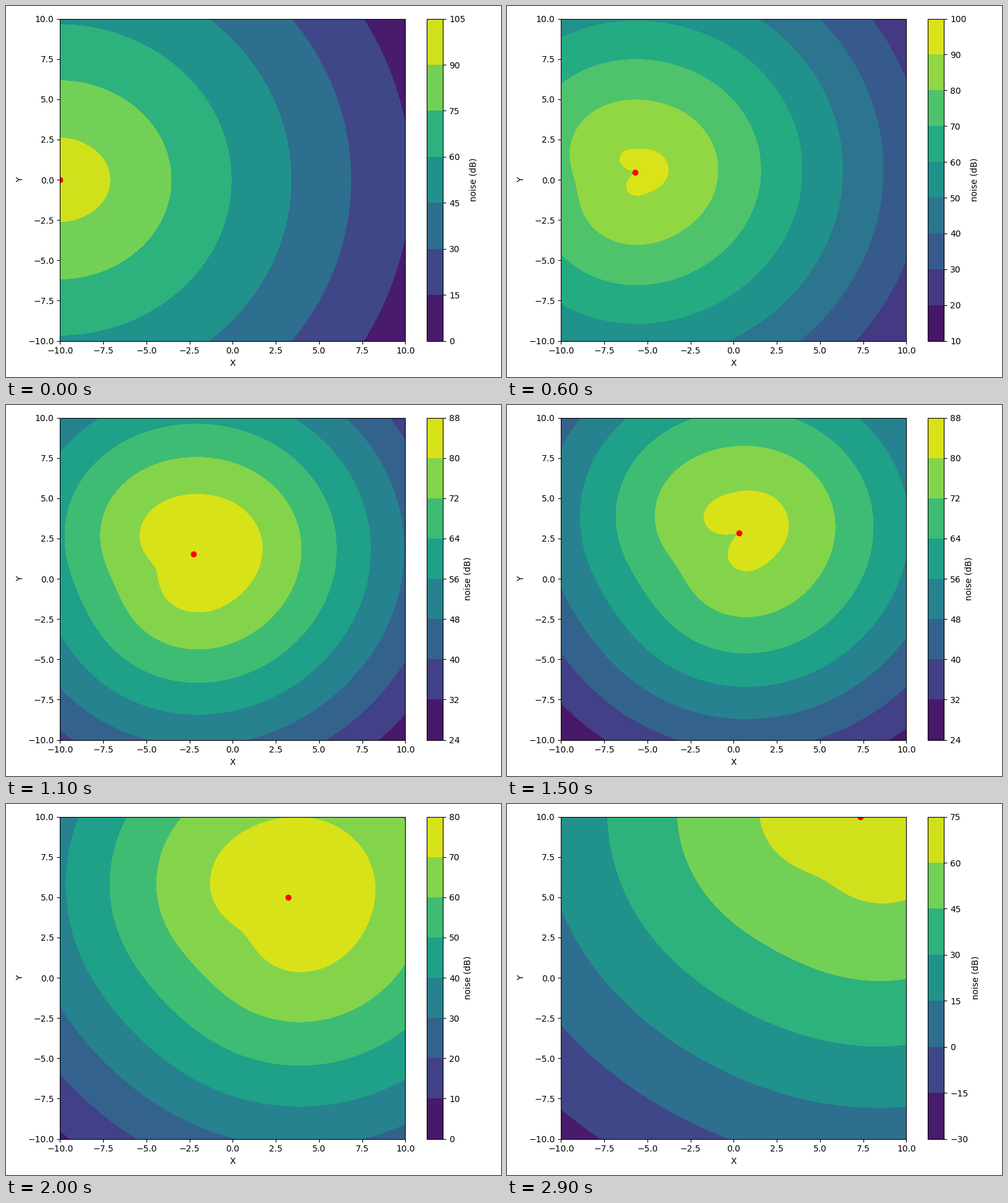
A matplotlib script for the animation above (3 s loop, 800 px wide and 600 px high).

```python
import numpy as np
import matplotlib.pyplot as plt
from matplotlib.animation import FuncAnimation

W, H, DPI = 800, 600, 100
FRAMES, INTERVAL = 30, 100
TURN_RADIUS = 20
TURN_ANGLE = np.pi / 3
CLIMB = 20 / 3

fig = plt.figure(figsize=(W / DPI, H / DPI), dpi=DPI)
axis = np.linspace(-10, 10, 200)
X, Y = np.meshgrid(axis, axis)


def add_axes(left, right, bottom=58.4, top=579.4):
    """Add axes given by their pixel edges."""
    return fig.add_axes([left / W, bottom / H,
                         (right - left) / W, (top - bottom) / H])


def flight(n):
    """Ground position, heading and altitude in a climbing left turn."""
    u = n / (FRAMES - 1)
    heading = TURN_ANGLE * u
    x = -10 + TURN_RADIUS * np.sin(heading)
    y = TURN_RADIUS * (1 - np.cos(heading))
    return x, y, heading, 1 + CLIMB * u


def noise(x, y, heading, altitude):
    """Noise level in dB on the ground, weakest behind the source."""
    dx, dy = X - x, Y - y
    c = np.cos(np.arctan2(dy, dx) - heading)
    power = 1.62 + 0.715 * c**3 - 0.105 * c**2 - 0.1 * c**4
    slant = np.sqrt(dx**2 + dy**2 + altitude**2)
    return 100 + 10 * np.log10(power * np.exp(-slant))


def draw(n):
    fig.clf()
    ax = add_axes(87.4, 645.4)
    cax = add_axes(680.3, 706.4)
    x, y, heading, altitude = flight(n)
    field = ax.contourf(X, Y, noise(x, y, heading, altitude))
    ax.plot(x, y, "ro")
    ax.set(xlim=(-10, 10), ylim=(-10, 10), xlabel="X", ylabel="Y")
    fig.colorbar(field, cax=cax, label="noise (dB)")


anim = FuncAnimation(fig, draw, frames=FRAMES, interval=INTERVAL,
                     repeat=True, repeat_delay=0)
plt.show()
```
